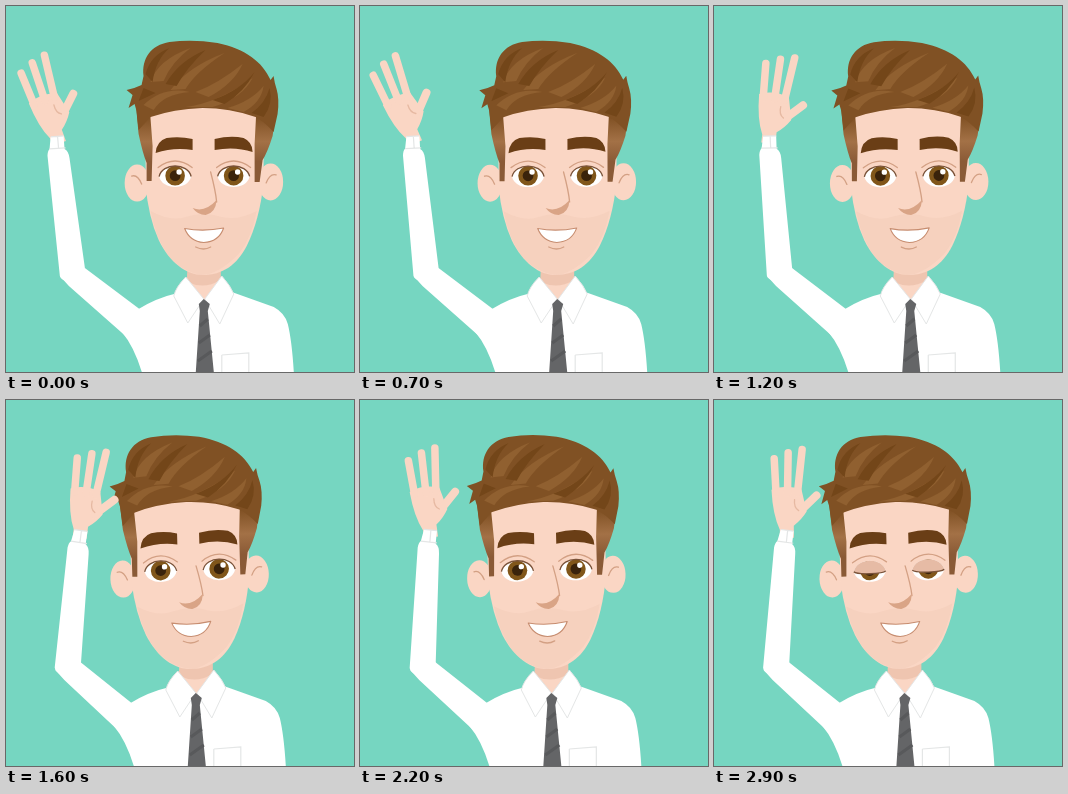
Recreate the animation shown at these times as an HTML page. Size 348 by 366 pixels, loop 3000 ms.

```html
<!DOCTYPE html>
<html lang="en">
<head>
<meta charset="utf-8">
<title>Waving man</title>
<style>
html, body { margin: 0; width: 100%; height: 100%; overflow: hidden; background: #76d6c1; }
svg { display: block; }
.skin { fill: #fad6c4; }
.white { fill: #fff; }
.hair { fill: #805124; }
.brow { fill: #6a3e16; }
.crease { fill: none; stroke: #d3a084; stroke-width: 1.3; stroke-linecap: round; }
.seam { fill: none; stroke: #e4e6e6; stroke-width: 1.2; }
</style>
</head>
<body>
<svg width="348" height="366" viewBox="0 0 348 366">
  <defs>
    <linearGradient id="fade" x2="0" y2="1">
      <stop offset=".2" stop-color="#805124"/>
      <stop offset=".5" stop-color="#a37146"/>
      <stop offset=".75" stop-color="#8a5a36"/>
    </linearGradient>
    <path id="eyeShape" d="M-16 0C-13 -14 13 -14 16 0C13 14 -13 14 -16 0Z"/>
    <clipPath id="eyeClip"><use href="#eyeShape"/></clipPath>
    <g id="eye">
      <use href="#eyeShape" fill="#fff"/>
      <g clip-path="url(#eyeClip)">
        <circle cy="-.8" r="9.8" fill="#80561a"/>
        <circle cy="-.8" r="5.4" fill="#3a230b"/>
        <circle cx="4" cy="-4.5" r="2.7" fill="#fff"/>
      </g>
      <path class="lid" fill="#e6bba5"/>
      <path class="lash" fill="none" stroke="#7a5238" stroke-width="1.3"/>
      <path class="crease" d="M-17 -9Q0 -22 17 -9"/>
    </g>
  </defs>

  <path id="upperArm" class="white"/>

  <g id="body">
    <path class="white" d="M172 287Q150 292 131 304L116 326Q128 340 136 366H288Q286 334 282 318Q279 307 268 301L226 286Z"/>
    <path fill="#efc5b0" d="M182 255H215V275L199 294L181 275Z"/>
    <path class="skin" d="M182 276Q198 284 215 274L199 294Z"/>
    <path class="white" stroke="#e4e6e6" d="M180 271Q170 281 168 290L182 317L198 293ZM216 270Q225 280 228 288L214 318L199 293Z"/>
    <path fill="#646567" d="M193 298L198 293L204 298L202 305L208 366H190L194 305Z"/>
    <path stroke="#58595b" stroke-width="3" d="M194 320L202 313M193 337L204 329M192 355L206 345"/>
    <path class="seam" d="M216 349L243 347V366M216 349V366"/>
  </g>

  <g id="head">
    <g id="ear">
      <ellipse class="skin" cx="131.5" cy="177" rx="12.5" ry="18.5"/>
      <path class="crease" d="M126 170Q132 168 136 178"/>
    </g>
    <use href="#ear" transform="matrix(-1 0 0 1 396.5 -1)"/>
    <path class="skin" d="M140 98V180Q143 212 153 234C164 257 181 269 197 269C217 269 231 259 241 240Q254 214 258 176V98Z"/>
    <path fill="#eec6b1" opacity=".35" d="M145 205Q165 216 180 211Q198 205 216 211Q232 215 251 205Q246 232 233 248Q213 268 197 269Q178 267 163 250Q150 232 145 205Z"/>
    <path fill="url(#fade)" d="M130 95L133 128Q137 147 141 157V175H146L147 140L144 100ZM272 95L267 130Q262 146 257 154L254 176H249V138L251 100Z"/>
    <path class="hair" d="M131 105L129 98L123 102L127 89L121 84Q130 82 136 79L138 70C136 53 145 39 164 36Q187 33 212 37C240 43 257 56 265 74L268 70Q269 77 271 83Q274 93 272 108L268 126Q259 116 250 111Q224 102 197 102Q168 103 145 111L133 124Z"/>
    <path fill="#906030" d="M145 76Q152 54 185 42Q166 56 158 75ZM165 84Q182 61 219 47Q190 66 180 83ZM138 99Q158 80 184 86Q158 88 148 104ZM190 86Q212 78 237 58Q228 78 203 91ZM180 101Q212 97 247 72Q237 92 207 101ZM222 102Q246 95 258 80Q256 96 238 106Z"/>
    <path fill="#734619" d="M140 68Q145 49 164 42Q150 54 147 76ZM160 78Q173 55 200 44Q181 62 171 80ZM138 82L150 87L133 95ZM207 94Q235 84 249 66Q239 86 219 98ZM246 107Q260 97 264 82Q268 98 258 111Z"/>
    <path class="brow" d="M150 147Q151 135 161 132Q174 130 187 133L187 144Q168 141 150 147ZM209 133Q225 129 238 132Q247 136 247 146Q229 140 209 144Z"/>
    <use href="#eye" x="169.5" y="170.5"/>
    <use href="#eye" x="228" y="170.5"/>
    <path class="crease" d="M205 166Q210 185 211 196"/>
    <path fill="#d9a486" d="M187 202Q199 207 211 194Q210 207 200 209Q192 209 187 202Z"/>
    <path fill="#fff" stroke="#c78d70" stroke-width="1.1" stroke-linejoin="round" d="M179 222.5Q198 226 218 222Q213 236 198 236.5Q184 235.5 179 222.5Z"/>
    <path class="crease" d="M190 241Q198 245 205 241"/>
  </g>

  <g id="forearm">
    <g id="hand" class="skin" stroke="#fad6c4" stroke-linecap="round">
      <path stroke="none" d="M-15 -40Q-14 -15 -7 0V8H7V-4Q15 -10 20 -18L15 -40Q0 -46 -15 -40Z"/>
      <path stroke-width="7.5" d="M-12 -71L-10.5 -37M2 -77L1 -37M16 -80L11 -37"/>
      <path stroke-width="8" d="M30 -34L12 -17"/>
      <path class="crease" style="stroke:#e6b9a2" d="M8 -30Q7 -22 12 -19"/>
    </g>
    <path class="white" d="M45 131L58 130L59 143Q63 145 64 152L80 262Q78 280 64 276Q56 274 55 270L42 150Q42 145 44 143Z"/>
    <path class="seam" d="M45 131L58 130M44 143L60 142M52 131L53 142"/>
  </g>
</svg>
<script>
const LOOP = 3000, STEP = 100, WAVE = 2000 / 3;
const byId = id => document.getElementById(id);
const move = (id, value) => byId(id).setAttribute('transform', value);
const shape = (el, d) => el.setAttribute('d', d);
const lid = document.querySelector('.lid'), lash = document.querySelector('.lash');
const cosAt = (t, peak) => Math.cos((t - peak) / WAVE * 2 * Math.PI);

function draw(t) {
  const sway = 0.6 * (1 + cosAt(t, 300));
  const tilt = 24 * cosAt(t, 400) - 0.5;
  const blink = Math.max(0, 1 - Math.abs(t % 2000 - 950) / 130);
  const elbow = -1 - 4 * sway, torso = -7 * sway, bend = 10.5 * sway;

  move('body', `translate(${torso})`);
  move('head', `translate(${-10 * sway}) rotate(${-1.5 * sway} 198 272)`);
  move('forearm', `translate(${elbow}) rotate(${bend} 66 266)`);
  move('hand', `translate(51 130) rotate(${tilt - bend})`);
  shape(byId('upperArm'), `M${55 + elbow} 270L${64 + elbow} 280L${122 + torso} 332L${150 + torso} 366V304H${135 + torso}L${80 + elbow} 262Z`);

  const y = -14 + 28 * blink;
  shape(lid, `M-16 0C-13 -14 13 -14 16 0C13 ${y} -13 ${y} -16 0Z`);
  shape(lash, `M-16 0C-13 ${y} 13 ${y} 16 0`);
}

function tick(now) {
  draw(Math.floor(now % LOOP / STEP) * STEP);
  requestAnimationFrame(tick);
}
draw(0);
requestAnimationFrame(tick);
</script>
</body>
</html>
```
